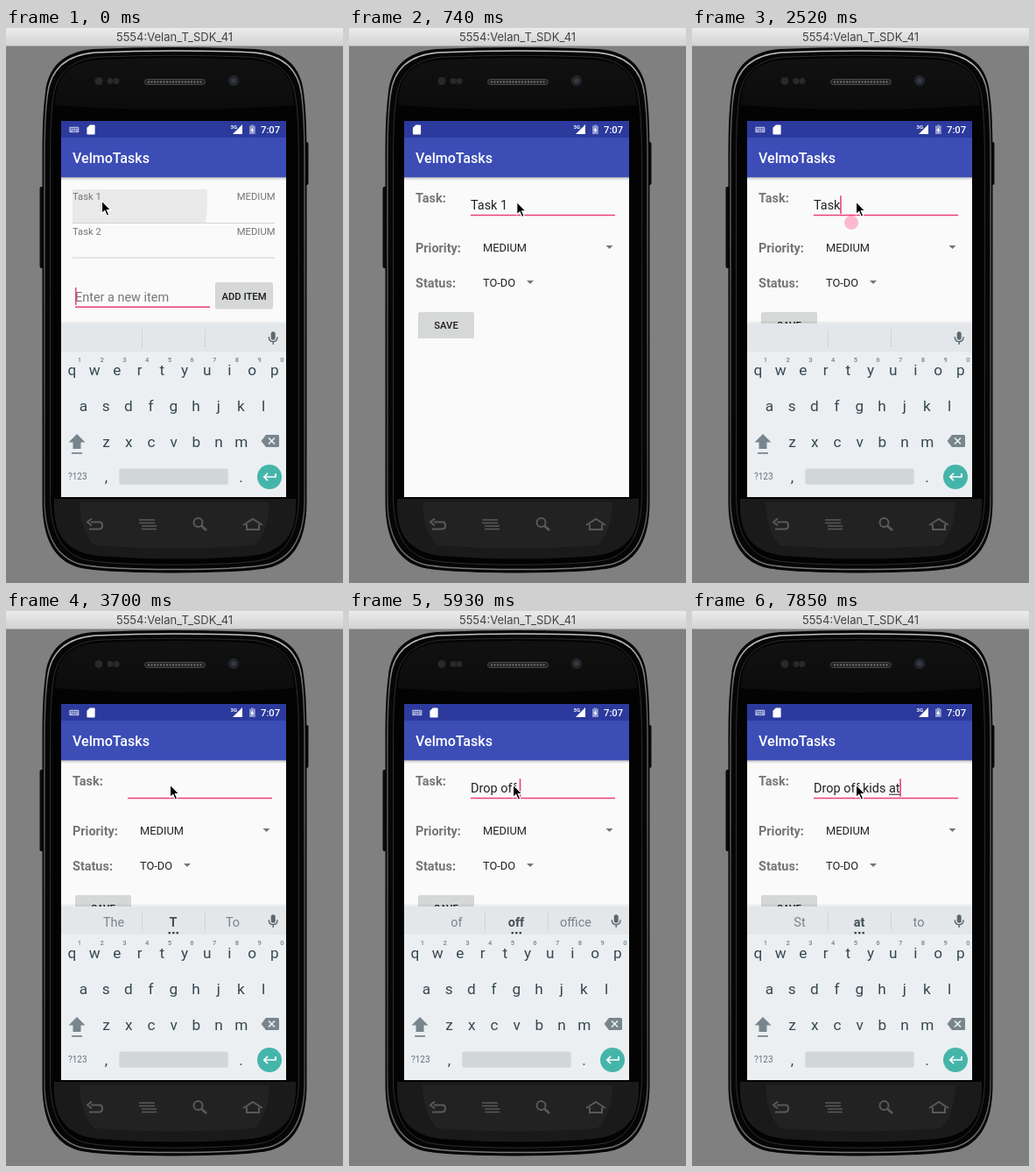
Animation, 385 px wide and 633 px high, one loop 8000 ms. Source, as an HTML page:

```html
<!DOCTYPE html>
<html lang="en">
<head>
<meta charset="utf-8">
<title>Task editor demo</title>
<style>
html, body { margin: 0; height: 100%; overflow: hidden; background: #808080; }
svg { display: block; width: 385px; height: 633px; font-family: Roboto, sans-serif; }
.bar { font: 13px Inter, sans-serif; fill: #424242; }
.mid { text-anchor: middle; }
.end { text-anchor: end; }
.small { font-size: 11.24px; fill: #757575; }
.label { font-size: 14.45px; font-weight: 700; fill: #757575; }
.edit { font-size: 14.45px; fill: #212121; }
.pick { font-size: 12.85px; fill: #212121; }
.btn { font-size: 11.24px; font-weight: 500; fill: #1c1c1c; }
.key { font-size: 17.2px; fill: #37474f; }
.num { font-size: 7.6px; font-weight: 500; fill: #75828a; }
.hint { font-size: 14.45px; fill: #78848a; }
.pink { fill: #ea3f7b; }
.grey { fill: #757575; }
.raised { fill: #d6d7d7; filter: drop-shadow(0 .6px .5px #0004); }
.nav { fill: none; stroke: #595959; stroke-width: 2; }
</style>
</head>
<body>
<svg viewBox="0 0 385 633">
  <defs>
    <linearGradient id="title" x2="0" y2="1"><stop stop-color="#ebebeb"/><stop offset="1" stop-color="#d3d3d3"/></linearGradient>
    <linearGradient id="rim" x2="0" y2="1"><stop stop-color="#c4c4c4"/><stop offset=".12" stop-color="#5c5c5c"/><stop offset=".85" stop-color="#444"/><stop offset="1" stop-color="#777"/></linearGradient>
    <linearGradient id="brow" x2="0" y2="1"><stop stop-color="#111"/><stop offset="1" stop-color="#0c0c0c"/></linearGradient>
    <linearGradient id="shade" x2="0" y2="1"><stop stop-opacity=".24"/><stop offset="1" stop-opacity="0"/></linearGradient>
    <clipPath id="screen"><path d="M63 106H320V535H63Z"/></clipPath>
    <path id="shell" vector-effect="non-scaling-stroke" d="M41.500 300V150C41.500 120 42 95 45 73C48 46 64 27 100 24Q192.500 20 285 24C321 27 337 46 340 73C343 95 343.500 120 343.500 150V540C343.500 584 329 607 303 615Q280 621 192.500 621.500Q105 621 82 615C56 607 41.500 584 41.500 540Z"/>
    <path id="drop" d="M-4 -2H4L0 2Z"/>
  </defs>

  <!-- window and phone body -->
  <rect width="385" height="20" fill="url(#title)"/>
  <rect y="20" width="385" height="1" fill="#a9a9a9"/>
  <text class="bar mid" x="192.500" y="15">5554:Velan_T_SDK_41</text>
  <rect x="38.500" y="181" width="5" height="93" rx="2" fill="#0a0a0a"/>
  <rect x="340" y="130" width="5.500" height="49" rx="2" fill="#0a0a0a"/>
  <use href="#shell" fill="#060606"/>
  <use href="#shell" fill="none" stroke="url(#rim)" stroke-width="1.500" transform="translate(3.100 4.200) scale(.984 .987)"/>
  <use href="#shell" fill="#030303" stroke="#2d2d2d" transform="translate(11.500 10) scale(.94 .969)"/>
  <path d="M56 88C57 50 75 38 110 36Q192 32 275 36C310 38 328 50 329 88Q192 98 56 88Z" fill="url(#brow)"/>
  <path d="M55 537H331V548C330 582 313 598 280 602Q192 609 105 602C72 598 56 582 55 548Z" fill="#1a1a1a"/>
  <path d="M84 541H301Q300 575 284 590Q192 597 101 590Q85 575 84 541Z" fill="#222"/>
  <rect x="158.500" y="58.500" width="69" height="6" rx="3" fill="#222" stroke="#4a4a4a"/>
  <path d="M162 61.500H224" stroke="#707070" stroke-width="2" stroke-dasharray="2 1.500"/>
  <g fill="#292929"><circle cx="106" cy="60.500" r="4.500"/><circle cx="119" cy="60.500" r="3.500"/><circle cx="126" cy="60.500" r="3.500"/></g>
  <circle cx="260" cy="60" r="6" fill="#24272b"/><circle cx="260" cy="60" r="2.500" fill="#343d4a"/>
  <g class="nav">
    <path d="M97 563.500H107Q110 563.500 110 567.500T106 571.500H95M98 559.500L93 563.500L98 567.500"/>
    <path d="M152 561H170M152 564.500H170M155 568H172M155 571.500H172" stroke-width="1.500"/>
    <circle cx="219.500" cy="564" r="5"/><path d="M223 567.500L229 573" stroke-width="3"/>
    <path d="M271 567L282 560L293 567M275 566V572H289V566"/>
  </g>

  <g clip-path="url(#screen)">
    <rect x="63" y="106" width="257" height="429" fill="#fafafa"/>

    <g id="list">
      <path d="M76 184H229.500Q231 204 228 222H76Z" fill="#e9e9e9"/>
      <path d="M76 222.500H307M76 262H307" stroke="#d2d2d2"/>
      <g class="small">
        <text x="76" y="195.500">Task 1</text><text class="end" x="307.500" y="195.500">MEDIUM</text>
        <text x="76" y="235.500">Task 2</text><text class="end" x="307.500" y="235.500">MEDIUM</text>
      </g>
      <text class="edit" x="79" y="311.500" style="fill:#777">Enter a new item</text>
      <path class="pink" d="M79 296H80.500V316H79ZM79 317.500H233V319H79Z"/>
      <rect class="raised" x="239.300" y="290.500" width="65.300" height="29.800" rx="1.600"/>
      <text class="btn mid" x="272" y="309.500">ADD ITEM</text>
    </g>

    <g id="form">
      <rect x="63" y="106" width="257" height="429" fill="#fafafa"/>
      <g class="label"><text x="76" y="199">Task:</text><text x="76" y="256">Priority:</text><text x="76" y="295.500">Status:</text></g>
      <text id="entry" class="edit" x="139" y="207"></text>
      <path class="pink" d="M139 212.800H304V214.200H139Z"/>
      <rect id="caret" class="pink" y="191.300" width="1.600" height="20.500"/>
      <rect id="under" y="208.700" height="1" fill="#212121"/>
      <path id="handle" fill="#ff4081" d="M182 212L187.700 216.300A8 8 0 1 1 176.300 216.300Z"/>
      <g class="pick"><text x="153" y="255">MEDIUM</text><text x="153" y="294.500">TO-DO</text></g>
      <use href="#drop" class="grey" x="297.500" y="250"/><use href="#drop" class="grey" x="207" y="290"/>
      <rect class="raised" x="79.200" y="324.500" width="63.800" height="29.500" rx="1.600"/>
      <text class="btn mid" x="111" y="343">SAVE</text>
    </g>

    <g id="board">
      <rect x="63" y="334.500" width="257" height="3" opacity=".05"/>
      <rect x="63" y="337" width="257" height="198" fill="#ebeff2"/>
      <rect x="63" y="337" width="257" height="32" fill="#e3e7ea"/>
      <path d="M155.500 344V364M227.500 344V364" stroke="#cdd3d7"/>
      <g class="hint mid">
        <text id="left" x="123" y="360"></text>
        <text id="best" x="191" y="360" font-weight="700" fill="#455057"></text>
        <text id="right" x="259" y="360"></text>
      </g>
      <path id="dots" d="M185.500 366h2.500v2.300h-2.500zM190 366h2.500v2.300h-2.500zM194.500 366h2.500v2.300h-2.500z" fill="#37474f"/>
      <rect x="302.700" y="346.200" width="5" height="9.500" rx="2.500" fill="#5d686e"/>
      <path d="M300.300 352.200Q300.300 357.700 305.200 357.700T310.100 352.200M305.200 357.700V361" fill="none" stroke="#5d686e" stroke-width="1.400"/>
      <g id="keys"></g>
      <path d="M81 463L90.500 472.500H85.500V480H76.500V472.500H71.500ZM75 484H87V485.700H75Z" fill="#78858c"/>
      <path d="M297 464H310.500Q312 464 312 465.500V476.500Q312 478 310.500 478H297L291.500 471Z" fill="#78858c"/>
      <path d="M300 467.500L307 474.500M307 467.500L300 474.500" stroke="#ebeff2" stroke-width="1.700"/>
      <text x="71" y="515" font-size="10" fill="#66747b">?123</text>
      <rect x="129.300" y="502.400" width="124.500" height="18.300" rx="2.500" fill="#d1d6d9"/>
      <circle cx="301" cy="512" r="14" fill="#45b5aa"/>
      <path d="M308 508V512H295M299 507.800L294.800 512L299 516.200" fill="none" stroke="#fff" stroke-width="1.700"/>
    </g>

    <!-- app bar and status bar -->
    <rect x="63" y="170" width="257" height="4" fill="url(#shade)"/>
    <rect x="63" y="125" width="257" height="45.300" fill="#3c4db6"/>
    <rect x="63" y="106" width="257" height="19" fill="#2c3a9d"/>
    <text x="76" y="154" font-size="16.060" font-weight="500" fill="#fff">VelmoTasks</text>
    <g id="ime"><rect x="72.300" y="112.800" width="11" height="6.400" rx="1" fill="#b3b9de"/>
      <path d="M73.500 114.500H82.500M73.500 116.200H82.500M75.500 117.900H80.500" stroke="#2c3a9d" stroke-width=".9" stroke-dasharray="1.200 .6"/></g>
    <path id="card" d="M-1.200 -5.500H3.700Q4.600 -5.500 4.600 -4.600V4.600Q4.600 5.500 3.700 5.500H-3.700Q-4.600 5.500 -4.600 4.600V-2.200Z" fill="#fff"/>
    <text x="256.500" y="114.500" font-size="6" font-weight="700" fill="#fff">3G</text>
    <path d="M270 110V121H259Z" fill="#fff"/>
    <path d="M280 110.500H282.800V111.500H284.800V121H278V111.500H280Z" fill="#8e97cd"/>
    <path d="M282.200 113L279.300 117H281L280.500 120L283.500 116H281.800Z" fill="#fff"/>
    <text x="291" y="120" font-size="11.240" font-weight="500" fill="#fff">7:07</text>
  </g>
  <path id="mouse" d="M0 0V14.500L3.300 11.500L5.800 17.300L8.300 16.200L5.800 10.600H10.300Z" stroke="#fff" stroke-width="1.100"/>
</svg>
<script>
const $ = id => document.getElementById(id);
const LOOP = 8000;

const label = (cls, x, y, s) => `<text class="${cls} mid" x="${x}" y="${y}">${s}</text>`;
const row = (s, x, y) => [...s].map((c, i) => label('key', x + i * 25.7, y, c)).join('');
$('keys').innerHTML = row('qwertyuiop', 75.500, 395.500) + row('asdfghjkl', 88.500, 437) +
  row('zxcvbnm', 114.500, 477.500) + label('key', 114.500, 518, ',') + label('key', 268.500, 518, '.') +
  [...'1234567890'].map((c, i) => label('num', 84 + i * 25.7, 380.800, c)).join('');

// [start, text, suggestions, underlined word]
const typing = [
  [0, 'Task 1'], [2520, 'Task'], [2670, 'Tas'],
  [2820, 'Ta', 'Task Tas Taste'], [2960, 'T', 'Take Ta Tax'], [3110, '', 'The T To'],
  [4300, 'D', 'The T To'], [4450, 'D', 'Do D Did'], [4590, 'Dr', 'Do D Did'],
  [4740, 'Dro', 'Drive Dr Drug'], [4890, 'Drop', 'Drops Drop Dropped', 'Drop'],
  [5190, 'Drop '], [5340, 'Drop o'], [5490, 'Drop of', 'or o on'],
  [5640, 'Drop off', 'if of off'], [5780, 'Drop off', 'of off office', 'off'],
  [5930, 'Drop off ', 'of off office'], [6070, 'Drop off '],
  [6670, 'Drop off k'], [6820, 'Drop off ki', 'Km k kid'], [6970, 'Drop off kid', 'Kim ki kid'],
  [7120, 'Drop off kids', 'kids kid kind'], [7260, 'Drop off kids', 'kid kids kind', 'kids'],
  [7410, 'Drop off kids '], [7560, 'Drop off kids a'],
  [7710, 'Drop off kids at', 'at a and'], [7850, 'Drop off kids at', 'St at to', 'at']
];
const pointer = [[0, 109.500, 197], [590, 152, 196], [740, 191.800, 198.300], [890, 196, 198], [1040, 191, 198], [1180, 187.500, 198]];
const blink = [[0, 1], [590, 0], [1180, 1], [1630, 0], [1780, 1], [2080, 0], [2520, 1],
  [3700, 0], [4300, 1], [6370, 0], [6670, 1]];
// [start, list, form opacity, form shift, keyboard opacity, keyboard shift]
const scenes = [[0, 1, 0, 0, 1, 0], [140, 1, .6, 8, .5, 0], [290, 0, 1, 0, 0, 0],
  [1630, 0, 1, 0, .8, 60], [1780, 0, 1, 0, 1, 0]];
const knob = [[0, 0], [1780, 1], [2520, .35], [2670, 0]];

const at = (steps, t) => steps.findLast(s => s[0] <= t);
const fade = (id, v) => $(id).setAttribute('opacity', v);
const move = (id, x, y) => $(id).setAttribute('transform', `translate(${x} ${y})`);
const nbsp = s => s.replaceAll(' ', '\u00a0');

const pen = document.createElement('canvas').getContext('2d');
function width(s) {
  pen.font = '14.45px Roboto, sans-serif';
  return pen.measureText(s).width;
}

function draw(t) {
  const [, list, form, formY, board, boardY] = at(scenes, t);
  fade('list', list);
  fade('form', form);
  move('form', 0, formY);
  fade('board', board);
  move('board', 0, boardY);
  fade('ime', board ? 1 : 0);
  move('card', board ? 97 : 77.500, 116);

  const [, text, words = '', marked = ''] = at(typing, t);
  const end = 139 + width(text), mark = width(marked);
  $('entry').textContent = nbsp(text);
  $('caret').setAttribute('x', end - .3);
  fade('caret', at(blink, t)[1]);
  $('under').setAttribute('x', end - mark);
  $('under').setAttribute('width', mark);
  const [a = '', b = '', c = ''] = words.split(' ');
  $('left').textContent = a;
  $('best').textContent = b;
  $('right').textContent = c;
  fade('dots', b ? 1 : 0);
  fade('handle', at(knob, t)[1]);

  const [, x, y] = at(pointer, t);
  move('mouse', x, y);
}

let start;
function tick(now) {
  start ??= now;
  draw((now - start) % LOOP);
  requestAnimationFrame(tick);
}
draw(0);
requestAnimationFrame(tick);
</script>
</body>
</html>
```
